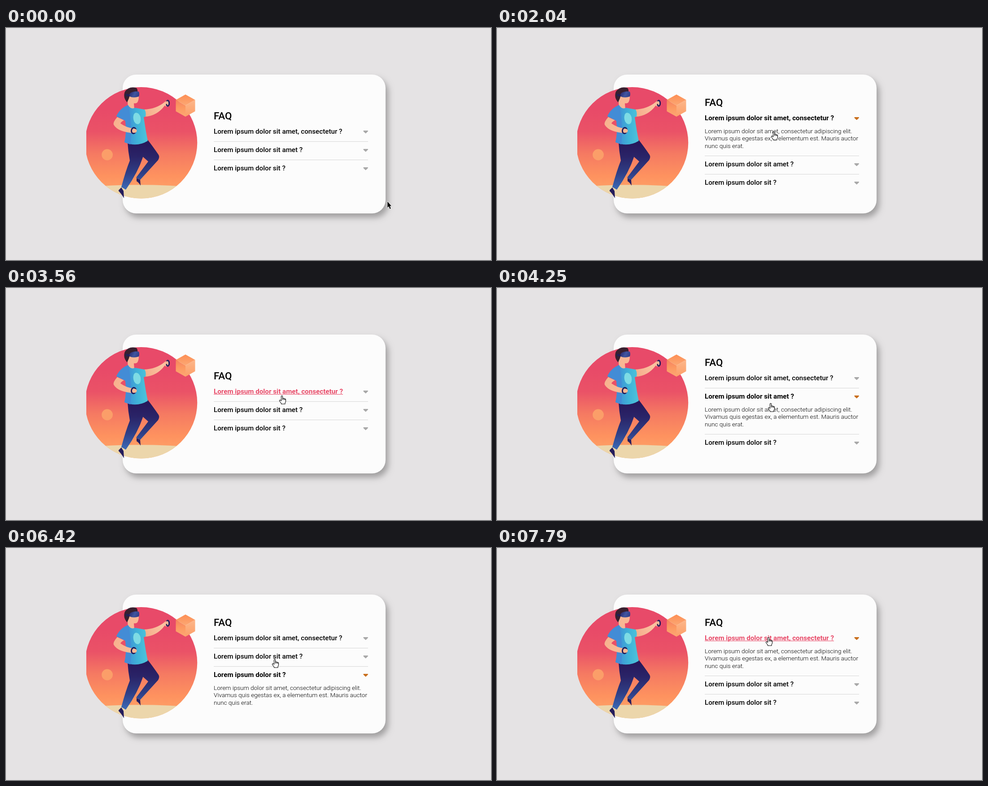
Animation of 1081x518 px, one loop 8000 ms. Source, as an HTML page with a canvas:

```html
<!DOCTYPE html>
<html lang="en">
<head>
<meta charset="utf-8">
<title>FAQ accordion</title>
<style>
html, body { margin: 0; width: 100%; height: 100%; overflow: hidden; background: #e5e3e4; }
canvas { display: block; width: 1081px; height: 518px; }
</style>
</head>
<body>
<canvas id="stage" width="1081" height="518"></canvas>
<script>
const ctx = document.getElementById('stage').getContext('2d');
const LOOP = 8000, LEFT = 463, RIGHT = 807;
const ROW = 41.2, BODY = 61.7, REACH = 11;
const TICK = 70, TRAVEL = 400, LAG = 80;
const QUESTIONS = [
  'Lorem ipsum dolor sit amet, consectetur ?',
  'Lorem ipsum dolor sit amet ?',
  'Lorem ipsum dolor sit ?'
];
const ANSWER = [
  'Lorem ipsum dolor sit amet, consectetur adipiscing elit.',
  'Vivamus quis egestas ex, a elementum est. Mauris auctor',
  'nunc quis erat.'
];

// Each click toggles one question.
const CLICKS = [
  { at: 2040, item: 0 }, { at: 3070, item: 0 }, { at: 4010, item: 1 },
  { at: 5840, item: 2 }, { at: 7330, item: 0 }
];
// Departure time and destination; every trip takes TRAVEL ms.
const TRIPS = [
  [0, 1009, 240], [440, 725, 186], [840, 695, 217], [1310, 617, 231], [2510, 614, 202],
  [3070, 615, 240], [3600, 611, 270], [4010, 608, 243], [4640, 599, 361], [5330, 599, 348],
  [5990, 599, 243], [6650, 594, 228], [7100, 602, 200], [7500, 607, 199]
];

const openAt = t => CLICKS.filter(c => c.at <= t)
  .reduce((open, c) => open === c.item ? -1 : c.item, -1);

function cursorAt(t) {
  const now = Math.floor(Math.max(t, 0) / TICK) * TICK;
  let x = 850, y = 387;
  for (const [start, tx, ty] of TRIPS) {
    const k = Math.min(1, Math.max(0, (now - start) / TRAVEL));
    x += (tx - x) * k;
    y += (ty - y) * k;
  }
  return { x: Math.round(x), y: Math.round(y) };
}

// Text baselines of the three questions.
function rowsFor(open) {
  const top = open < 0 ? 236 : 206;
  return QUESTIONS.map((q, i) => Math.round(top + i * ROW + (open >= 0 && i > open ? BODY : 0)));
}

function shape(d, fill) {
  ctx.fillStyle = fill;
  ctx.fill(new Path2D(d));
}

function ellipse(x, y, rx, ry, turn = 0) {
  ctx.beginPath();
  ctx.ellipse(x, y, rx, ry, turn, 0, Math.PI * 2);
}

function oval(fill, ...at) {
  ellipse(...at);
  ctx.fillStyle = fill;
  ctx.fill();
}

function ring(...at) {
  ellipse(...at);
  ctx.strokeStyle = '#211c5c';
  ctx.lineWidth = 3;
  ctx.stroke();
}

function blend(x0, y0, x1, y1, ...colors) {
  const g = ctx.createLinearGradient(x0, y0, x1, y1);
  colors.forEach((c, i) => g.addColorStop(i / (colors.length - 1), c));
  return g;
}

function text(str, x, y, weight, size, color = '#000') {
  ctx.font = `${weight} ${size}px Roboto, sans-serif`;
  ctx.fillStyle = color;
  ctx.fillText(str, x, y);
}

function drawCard() {
  ctx.fillStyle = '#e5e3e4';
  ctx.fillRect(0, 0, 1081, 518);
  ctx.save();
  ctx.shadowColor = 'rgba(0,0,0,.3)';
  ctx.shadowBlur = 14;
  ctx.shadowOffsetX = 6;
  ctx.shadowOffsetY = 9;
  ctx.fillStyle = '#fcfcfc';
  ctx.beginPath();
  ctx.roundRect(260, 104, 586, 310, 30);
  ctx.fill();
  ctx.restore();
}

function drawScene() {
  ctx.save();
  ctx.beginPath();
  ctx.rect(179, 130, 250, 252);
  ctx.clip();
  ellipse(301.3, 256.3, 125, 124.3);
  ctx.clip();
  ctx.fillStyle = blend(0, 132, 0, 380, '#e84a69', '#e84a68', '#ea5267', '#f57a62', '#fe925f', '#fda86c');
  ctx.fillRect(170, 130, 260, 252);
  shape('M170 356Q302 344 436 357V390H170Z', '#ecd6ab');
  ctx.restore();
  oval('#fb9e69', 225.6, 283, 12.4, 12.4);

  shape('M400 148.5L421.5 160.5L400 173L378.5 160.5Z', blend(0, 149, 0, 173, '#fd8f55', '#fca874'));
  shape('M378.5 160.5L400 173V198L378.5 186Z', blend(0, 162, 0, 196, '#f6835f', '#fd9a62', '#fca672'));
  shape('M421.5 160.5L400 173V198L421.5 186Z', blend(0, 162, 0, 196, '#fcb68a', '#fda069'));
}

function drawPlayer() {
  const skin = '#f9b794', navy = '#241c5c';
  const trousers = blend(0, 252, 0, 360, '#261759', '#2a2468', '#2f3f86', '#3b69b6');
  // legs
  shape('M290 258L316 250Q327 264 340 283Q343 288 339 295L299 339L290 334L317 298L300 283Z', trousers);
  shape('M271 255Q293 266 316 251L306 286Q294 323 267 361L257 355Q267 318 276 296Q272 275 271 255Z', trousers);
  shape('M291 335L299 339L300 352Q296 345 291 342Z', navy);
  shape('M251 362L257 356L262 364L263 380Q257 370 251 364Z', navy);

  // raised arm
  shape('M307 182Q335 181 354 165Q359 160 364 164Q365 170 361 175Q356 176 354 173Q336 197 309 198Z',
    blend(308, 195, 345, 175, '#f6a988', '#f9c3a0'));
  ring(360.5, 168, 3.2, 6.2);
  shape('M353 166L359 163L361 167L355 172Z', skin);

  // neck and face
  shape('M270 152H296Q296 163 292 167Q288 169 285 168L286 181Q280 188 272 177Z', skin);

  // shirt
  shape('M272 172Q279 183 287 178L309 182Q313 188 311 198L307 199Q311 228 316 252Q291 267 264 255Q269 234 266 207L246 197Q255 179 272 172Z',
    blend(255, 0, 312, 0, '#4589d3', '#3f95d6', '#3fb2d8', '#4bc1da'));
  shape('M272 172Q254 179 246 197L266 207Q271 231 264 255L277 260Q281 228 275 184Z', '#438cd6');
  oval('#7edbe4', 292, 202, 8.2, 13, -.2);

  // bent arm
  shape('M248 199L263 206Q257 209 255 213Q269 223 284 224L288 235Q250 233 240 216Q238 210 248 199Z',
    blend(240, 200, 288, 235, '#f7b08d', '#f9bd99'));
  ring(284.5, 229, 5, 6.5, .2);
  oval(skin, 286.5, 229.5, 5, 4.5);

  // hair and headset
  shape('M270 166Q260 155 265 142Q275 129 291 134Q294 138 293 143L277 147L274 157Z', '#38202f');
  shape('M267 147L277 148V153L267 152Z', '#201f57');
  shape('M277 145Q286 140 296 142Q298 148 296 153Q284 157 276 153Q274 149 277 145Z',
    blend(276, 143, 297, 153, '#2b2b70', '#4056a0', '#303a82'));
}

function drawChevron(y, color) {
  ctx.fillStyle = ctx.strokeStyle = color;
  ctx.lineWidth = 2;
  ctx.lineJoin = 'round';
  const chevron = new Path2D(`M797.3 ${y - 1.7}h8.7l-4.35 4.1Z`);
  ctx.fill(chevron);
  ctx.stroke(chevron);
}

function drawFaq(open, rows, pointer) {
  text('FAQ', LEFT, rows[0] - 32, 500, 22.4);
  QUESTIONS.forEach((q, i) => {
    const y = rows[i], isOpen = i === open;
    const hot = pointer.x < 752 && Math.abs(pointer.y - y + 5) < REACH;
    text(q, LEFT, y, hot || isOpen ? 700 : 500, 15.2, hot ? '#e84a68' : '#000');
    if (hot) ctx.fillRect(LEFT, y + 1, ctx.measureText(q).width, 1);
    drawChevron(y - 4.2, isOpen ? '#c96f1e' : '#a8a8a8');
    if (isOpen) ANSWER.forEach((line, n) => text(line, LEFT, Math.round(y + 29.2 + n * 16.2), 300, 13.6));
    if (i) {
      ctx.fillStyle = '#d6d6d6';
      ctx.fillRect(LEFT, y - 24, RIGHT - LEFT, 1);
    }
  });
}

function drawCursor({ x, y }, rows) {
  const overList = x < RIGHT && y > rows[0] - 5 - REACH && y < rows[2] - 5 + REACH;
  ctx.save();
  ctx.translate(x, y);
  ctx.lineJoin = 'round';
  if (overList) {
    const hand = new Path2D('M-1.5 12V1.5Q0 -.5 1.5 1.5V6.5Q3 5.5 4.2 7Q5.7 6.2 6.6 7.7Q8.5 7.3 8.5 9.3V13Q8.3 15 7 16.5V19H-1.5V17.5L-5.3 12.5Q-6 10.5 -4.3 10Q-2.8 10.3 -1.5 12Z');
    ctx.fillStyle = '#fff';
    ctx.fill(hand);
    ctx.strokeStyle = '#000';
    ctx.lineWidth = 1.1;
    ctx.stroke(hand);
    ctx.stroke(new Path2D('M1.5 6.5V10M4.2 7.2V10M6.6 7.9V10.3'));
  } else {
    const arrow = new Path2D('M.3 .5V14L3.2 11.2L5.6 17L7.8 16L5.4 10.4H9Z');
    ctx.strokeStyle = '#fff';
    ctx.lineWidth = 1.4;
    ctx.stroke(arrow);
    ctx.fillStyle = '#000';
    ctx.fill(arrow);
  }
  ctx.restore();
}

function frame(now) {
  const t = now % LOOP, open = openAt(t), rows = rowsFor(open);
  drawCard();
  drawScene();
  drawPlayer();
  drawFaq(open, rows, cursorAt(t - LAG));
  // the pointer leaves the window for a moment
  if (t < 350 || t >= 490) drawCursor(cursorAt(t), rows);
  requestAnimationFrame(frame);
}
frame(0);
</script>
</body>
</html>
```
